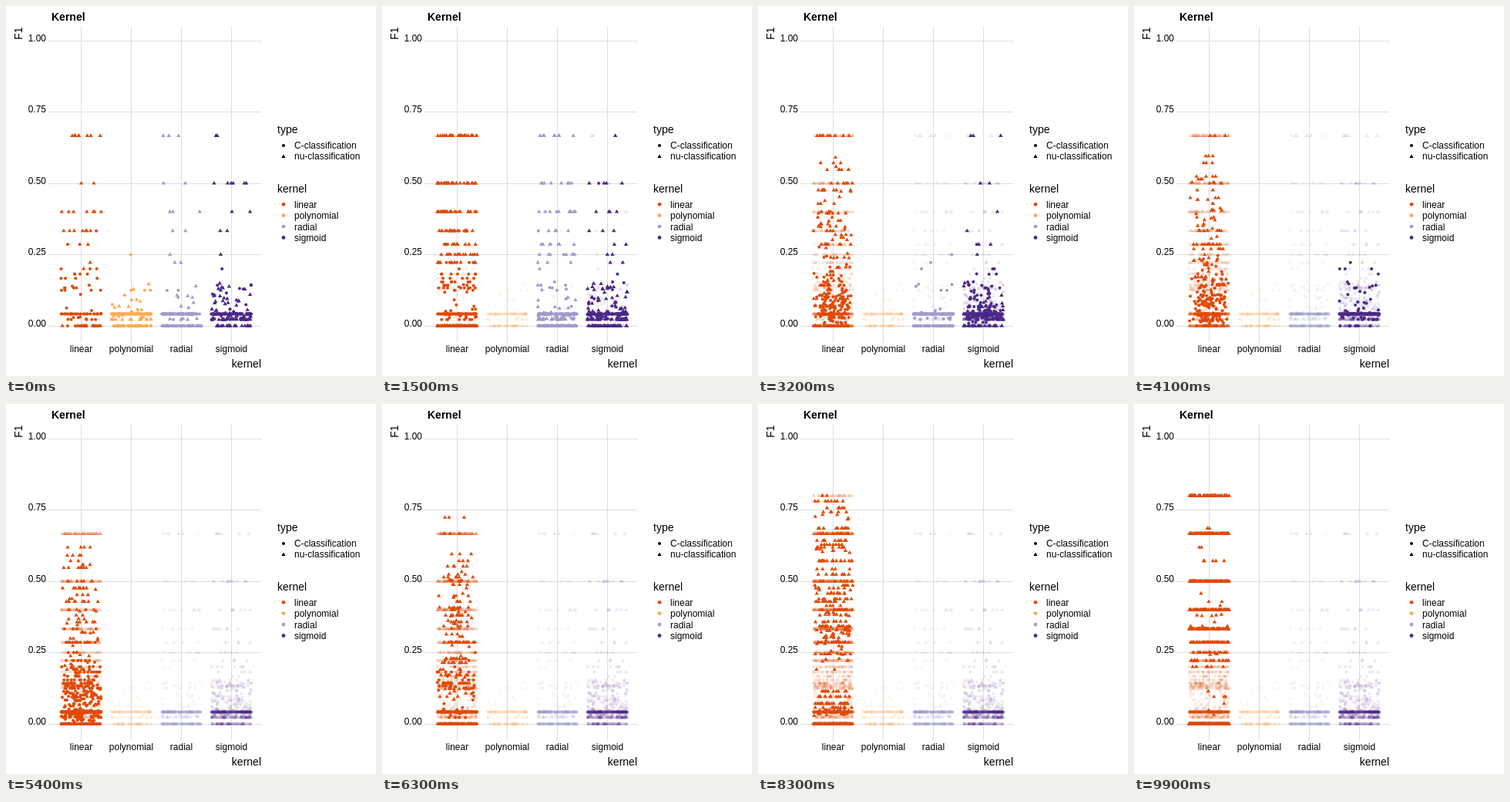
Write an HTML page with a canvas that moves like this. It is 480x480 px and loops after 10000 ms.

```html
<!DOCTYPE html>
<html lang="en">
<head>
<meta charset="utf-8">
<title>Kernel</title>
<style>
  html, body { margin: 0; height: 100%; overflow: hidden; background: #fff; }
  canvas { display: block; width: 480px; height: 480px; }
</style>
</head>
<body>
<canvas id="plot" width="480" height="480"></canvas>
<script>
const ctx = document.getElementById('plot').getContext('2d');
const kernels = ['linear', 'polynomial', 'radial', 'sigmoid'];
const colors = ['#e04a07', '#fcab52', '#a19bca', '#4b2987'];
const FRAMES = 100, STATES = 9, GHOST = 0.1, CHANCE = 1 / 24;
const colX = k => 97.5 + 65 * k;
const scoreY = v => 415 - 370 * v;

let seed = 4242;
const rand = () => (seed = (seed * 16807) % 2147483647) / 2147483647;

// Good scores are fractions 2/n: triangles favour the high ones, circles the low ones.
// From the seventh state on, triangles also reach 0.8.
function goodScore(circle, state) {
  if (circle) return 2 / (4 + Math.floor(13 * Math.sqrt(rand())));
  if (rand() < 0.05 * (state - 5)) return 0.8;
  return 2 / (3 + Math.floor(8 * (1 - Math.sqrt(rand()))));
}

// Shares of good, low and chance-level scores; the rest score zero.
function score({ circle, good, low, chance }, state) {
  const u = rand();
  if (u < good) return goodScore(circle, state);
  if (u < good + low) return 0.022 + 0.13 * rand() ** 3;
  return u < good + low + chance ? CHANCE : 0;
}

// Each series lists how many points it has in each state.
const series = [
  { kernel: 0, circle: false, good: 0.72, low: 0, chance: 0, counts: [40, 190, 155, 120, 135, 210, 430, 420, 500] },
  { kernel: 0, circle: true, good: 0.3, low: 0.2, chance: 0.35, counts: [75, 170, 190, 190, 420, 140] },
  { kernel: 1, circle: false, good: 0, low: 0.65, chance: 0, counts: [36] },
  { kernel: 1, circle: true, good: 0.04, low: 0.06, chance: 0.6, counts: [140] },
  { kernel: 2, circle: false, good: 0.35, low: 0.3, chance: 0.05, counts: [48, 140] },
  { kernel: 2, circle: true, good: 0.05, low: 0.08, chance: 0.55, counts: [120, 150, 150] },
  { kernel: 3, circle: false, good: 0.08, low: 0.58, chance: 0.12, counts: [120, 165, 90] },
  { kernel: 3, circle: true, good: 0.05, low: 0.27, chance: 0.64, counts: [75, 90, 180, 145] }
];

// states[s][i] holds the [x, y] points of series i in state s.
const states = Array.from({ length: STATES }, (_, s) => series.map(item =>
  Array.from({ length: item.counts[s] || 0 }, () =>
    [colX(item.kernel) + rand() * 52 - 26, scoreY(score(item, s))])));

function mark(x, y, circle, radius = 2) {
  ctx.beginPath();
  if (circle) {
    ctx.arc(x, y, radius, 0, 7);
  } else {
    ctx.moveTo(x, y - 3);
    ctx.lineTo(x + 2.7, y + 1.6);
    ctx.lineTo(x - 2.7, y + 1.6);
  }
  ctx.fill();
}

function text(s, x, y, size = 12, align = 'left', weight = '') {
  ctx.font = `${weight} ${size}px "Liberation Sans", Arial, sans-serif`;
  ctx.textAlign = align;
  ctx.fillText(s, x, y);
}

function drawAxes() {
  ctx.fillStyle = '#fff';
  ctx.fillRect(0, 0, 480, 480);
  for (let v = 0; v <= 1; v += 0.25) {
    ctx.fillStyle = '#dedede';
    ctx.fillRect(55, Math.floor(scoreY(v)), 276, 1);
    ctx.fillStyle = '#000';
    text(v.toFixed(2), 52, scoreY(v) + 0.5, 12, 'right');
  }
  kernels.forEach((name, k) => {
    ctx.fillStyle = '#dedede';
    ctx.fillRect(colX(k) - 0.5, 27, 1.1, 410);
    ctx.fillStyle = '#000';
    text(name, colX(k), 449, 12, 'center');
  });
  text('Kernel', 59, 19, 14, 'left', 'bold');
  text('kernel', 331, 469, 14, 'right');
  ctx.save();
  ctx.translate(21, 27.5);
  ctx.rotate(-Math.PI / 2);
  text('F1', 0, 0, 14, 'right');
  ctx.restore();
}

function drawLegend() {
  text('type', 352, 165, 14);
  text('C-classification', 374, 185);
  text('nu-classification', 374, 199);
  mark(360, 181, true);
  mark(360, 195.5, false);
  text('kernel', 352, 242, 14);
  kernels.forEach((name, k) => {
    ctx.fillStyle = '#000';
    text(name, 374, 262 + 14.3 * k);
    ctx.fillStyle = colors[k];
    mark(360, 257.3 + 14.4 * k, true, 2.4);
  });
}

// Paired points move linearly; unpaired ones stay until the next state begins.
function drawState(from, to, p) {
  series.forEach(({ kernel, circle }, i) => {
    ctx.fillStyle = colors[kernel];
    from[i].forEach(([x, y], j) => {
      const [endX, endY] = to[i][j] || [x, y];
      mark(x + (endX - x) * p, y + (endY - y) * p, circle);
    });
  });
}

const endOf = k => k === 1 ? 11 : 11 * k + 1;

function draw(frame) {
  let k = 1;
  while (frame >= endOf(k)) k++;
  const span = k === 1 ? 8 : 7;
  const p = Math.max(0, 1 - (endOf(k) - frame) / span);

  drawAxes();
  drawLegend();
  ctx.globalAlpha = GHOST;
  states.slice(0, k).forEach(s => drawState(s, s, 0));
  ctx.globalAlpha = 1;
  drawState(states[k - 1], states[k % STATES], p);
}

const start = performance.now();
let shown = -1;
function tick() {
  const frame = Math.floor((performance.now() - start) / 100) % FRAMES;
  if (frame !== shown) draw(shown = frame);
  requestAnimationFrame(tick);
}
tick();
</script>
</body>
</html>
```
